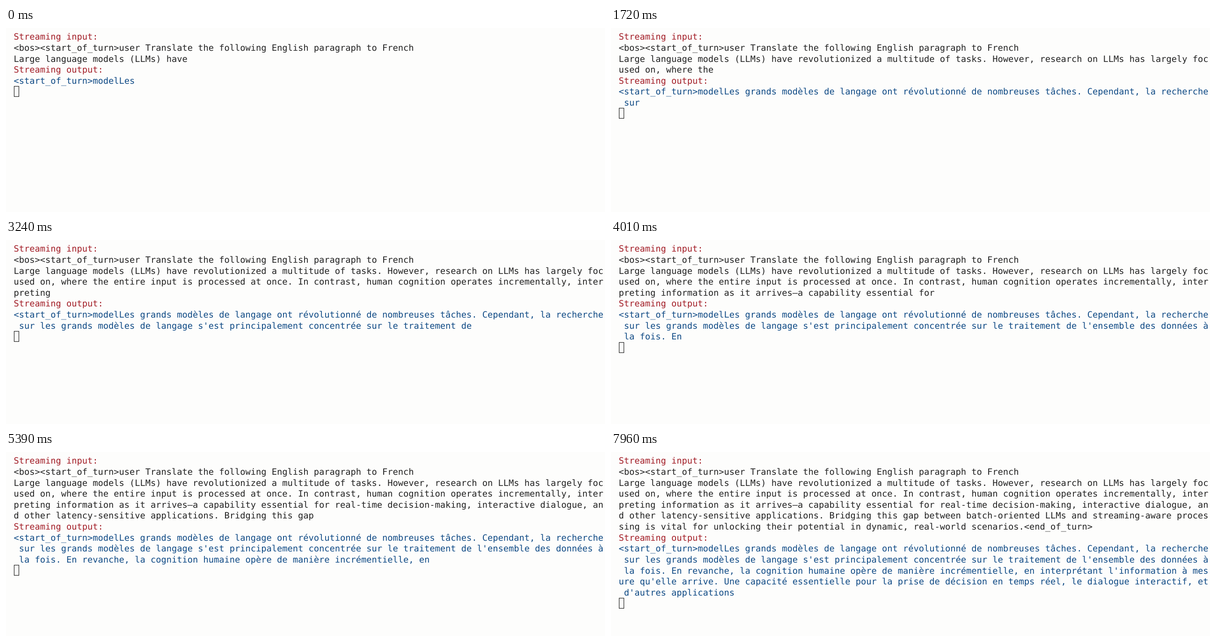
An HTML page that plays this animation: 1280x396 px, repeating every 7990 ms.

```html
<!DOCTYPE html>
<html lang="en">
<head>
<meta charset="utf-8">
<title>Streaming translation</title>
<style>
  html, body { margin: 0; width: 100%; height: 100%; overflow: hidden; background: #fdfdfc; }
  svg { display: block; width: 100%; height: 100%; }
  text {
    font: 18.7px "DejaVu Sans Mono", monospace;
    white-space: pre;
    text-rendering: geometricPrecision;
  }
</style>
</head>
<body>
<svg id="stage" viewBox="0 0 1280 396"></svg>
<script>
const LOOP = 7990, COLUMNS = 112, LEFT = 16.4, BASELINE = 25.3, LINE = 23.63;
const BLACK = "#222222", RED = "#a31f28", BLUE = "#0f4a85";

const prompt = "<bos><start_of_turn>user Translate the following English paragraph to French";
const input = ("Large language models (LLMs) have revolutionized a multitude of tasks. However, " +
  "research on LLMs has largely focused on, where the entire input is processed at once. " +
  "In contrast, human cognition operates incrementally, interpreting information as it " +
  "arrives—a capability essential for real-time decision-making, interactive dialogue, and " +
  "other latency-sensitive applications. Bridging this gap between batch-oriented LLMs and " +
  "streaming-aware processing is vital for unlocking their potential in dynamic, real-world " +
  "scenarios.<end_of_turn>").split(" ");
const output = ("<start_of_turn>modelLes grands modèles de langage ont révolutionné de nombreuses " +
  "tâches. Cependant, la recherche sur les grands modèles de langage s'est principalement " +
  "concentrée sur le traitement de l'ensemble des données à la fois. En revanche, la " +
  "cognition humaine opère de manière incrémentielle, en interprétant l'information à mesure " +
  "qu'elle arrive. Une capacité essentielle pour la prise de décision en temps réel, le " +
  "dialogue interactif, et d'autres applications").split(" ");

// Time in ms, words read, words written
const pace = [
  [0, 5, 1], [940, 13, 9], [2700, 28, 22], [4010, 40, 33],
  [5390, 51, 42], [6610, 61, 51], [7420, 67, 57], [7960, 67, 65]
];

const stage = document.getElementById("stage");

function add(tag, attributes) {
  const node = document.createElementNS("http://www.w3.org/2000/svg", tag);
  for (const name in attributes) node.setAttribute(name, attributes[name]);
  return stage.appendChild(node);
}

const rows = Array.from({ length: 15 }, (_, i) => add("text", { x: LEFT, y: BASELINE + i * LINE }));
const cursor = add("rect", { x: 17.5, width: 10, height: 22, fill: "none", stroke: BLACK, "stroke-width": 1.2 });

// Reads and writes take turns, one word per step.
function wordCounts(t) {
  let k = 0;
  while (k < pace.length - 2 && t >= pace[k + 1][0]) k++;
  const [t0, in0, out0] = pace[k], [t1, in1, out1] = pace[k + 1];
  const reads = in1 - in0, steps = reads + out1 - out0;
  const done = Math.round(Math.min(1, (t - t0) / (t1 - t0)) * steps);
  const read = Math.ceil(done * reads / steps);
  return [in0 + read, out0 + done - read];
}

function wrap(words, count, color) {
  const text = words.slice(0, count).join(" "), lines = [];
  for (let i = 0; i < text.length; i += COLUMNS) lines.push([text.slice(i, i + COLUMNS), color]);
  return lines;
}

function render(t) {
  const [read, written] = wordCounts(t);
  const lines = [
    ["Streaming input:", RED],
    [prompt, BLACK],
    ...wrap(input, read, BLACK),
    ["Streaming output:", RED],
    ...wrap(output, written, BLUE)
  ];
  rows.forEach((row, i) => {
    const [text, color] = lines[i] || ["", BLACK];
    if (row.textContent !== text) row.textContent = text;
    row.setAttribute("fill", color);
  });
  cursor.setAttribute("y", Math.round(7 + lines.length * LINE) + 0.5);
}

const start = performance.now();
function tick() {
  render((performance.now() - start) % LOOP);
  requestAnimationFrame(tick);
}
tick();
</script>
</body>
</html>
```
